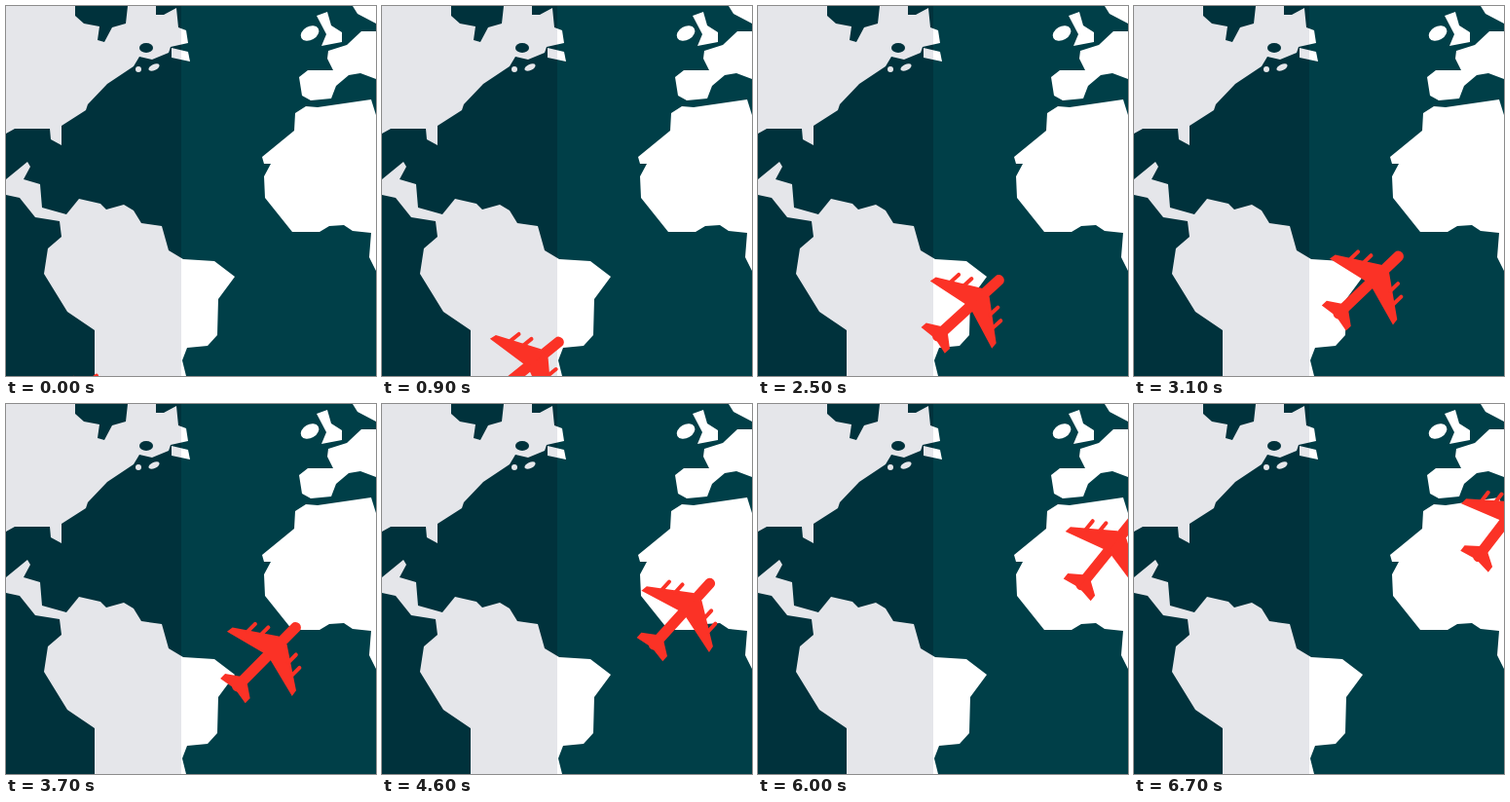
These frames come from a looping animation (380 by 380 pixels, 6.8 s). An HTML page:

```html
<!DOCTYPE html>
<html lang="en">
<head>
<meta charset="utf-8">
<title>Plane over the Atlantic</title>
<style>
html, body { margin: 0; width: 100%; height: 100%; overflow: hidden; }
svg { display: block; width: 380px; height: 380px; }
</style>
</head>
<body>
<svg viewBox="0 0 380 380">
  <defs>
    <linearGradient id="land" gradientUnits="userSpaceOnUse" x1="0" x2="360">
      <stop offset=".5" stop-color="#e5e6ea"/>
      <stop offset=".5" stop-color="#fff"/>
    </linearGradient>
    <path id="engine" d="M0 0H11" stroke="#fb3226" stroke-width="4" stroke-linecap="round"/>
    <!-- wing, engines and tailplane of one side, nose pointing right -->
    <g id="side">
      <path d="M24 0V6L-3 46-10 47 2 0ZM-33 0V5L-42 18-49 18-46 0Z"/>
      <use href="#engine" x="12" y="20"/>
      <use href="#engine" x="5" y="32"/>
    </g>
  </defs>
  <rect width="380" height="380" fill="#003f48"/>
  <rect width="180" height="380" fill="#00323c"/>
  <g fill="url(#land)">
    <!-- North America and its islands -->
    <path d="M0 0H71V10L80 18 96 21 94 35 101 37 109 22 123 18 125 0H154V9H162L175 2 177 22 185 25 187 38 169 42 167 48 150 55 137 52 131 62 104 80 84 101 82 107 57 123V143L46 137 45 126H9L0 131Z"/>
    <ellipse cx="144" cy="43" rx="7" ry="5" fill="#00323c"/>
    <path d="M170 43 187 47 189 57 170 53Z"/>
    <circle cx="136" cy="65" r="3"/>
    <ellipse cx="152" cy="63" rx="6" ry="3" transform="rotate(-25 152 63)"/>
    <!-- Central and South America -->
    <path d="M0 178 22 160 25 165 18 178 35 183 37 207 62 214 75 198 97 203 103 209 121 204 131 210 139 223 160 226 167 251 182 260 214 262 235 278 218 301 217 338 207 349 186 351 181 364 185 380H91V333L63 314 39 275 43 249 57 237 55 221 30 217 14 197 0 194Z"/>
    <!-- Africa -->
    <path d="M380 112 375 96 320 104 308 103 297 110 296 128 263 155 265 162H272L265 175 266 197 294 232H322L332 226 347 225 356 231 375 233 373 258 380 272Z"/>
    <!-- Europe and the British Isles -->
    <path d="M380 26H365L350 40 331 46 330 54 336 66H310L301 73 304 92 313 97 334 95 339 82 352 71 364 69 380 75ZM356 0 361 8 380 18V0ZM319 10 330 6 334 20 345 27V37L324 41 329 29Z"/>
    <ellipse cx="312" cy="28" rx="10" ry="7" transform="rotate(-30 312 28)"/>
  </g>
  <g id="plane" fill="#fb3226">
    <path d="M-47 0H43" stroke="#fb3226" stroke-width="11" stroke-linecap="round" stroke-dasharray="78 0" pathLength="78" transform="translate(2) scale(.95 1)"/>
    <use href="#side"/>
    <use href="#side" transform="scale(1 -1)"/>
  </g>
</svg>
<script>
const LOOP = 6.8, STEP = 0.1;
const plane = document.getElementById('plane');

// A bent track around the midpoint of the flight, with a gently pulsing speed.
function pose(t) {
  const u = t - 4.15;
  const w = u + 0.09 * Math.sin(1.5 * u);
  return {
    x: 288 + 40 * w - 1.34 * w ** 2,
    y: 238 - 43.3 * w - 0.77 * w ** 2 - 0.15 * w ** 3,
    heading: 46.5 + 2.4 * w
  };
}

const start = performance.now();
function tick() {
  const t = (performance.now() - start) / 1000 % LOOP;
  const { x, y, heading } = pose(Math.floor(t / STEP + 1e-6) * STEP);
  plane.setAttribute('transform', `translate(${x} ${y}) rotate(${-heading})`);
  requestAnimationFrame(tick);
}
tick();
</script>
</body>
</html>
```
